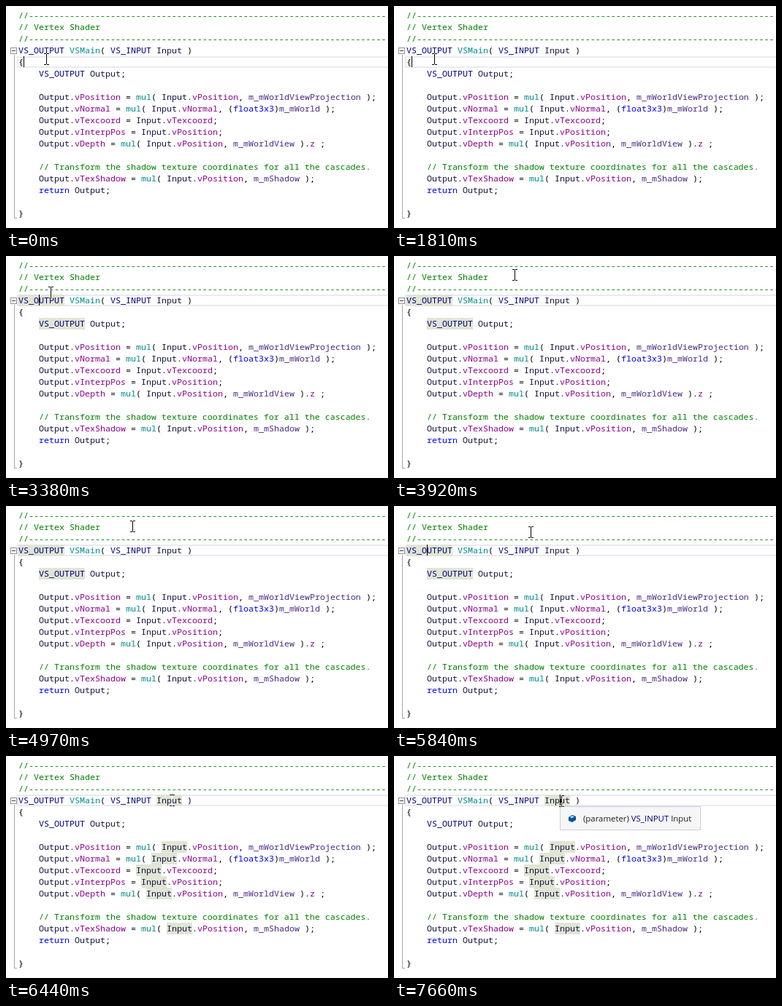
An HTML page for the animation above (8000 ms loop, 523 by 305 pixels).

```html
<!DOCTYPE html>
<html lang="en">
<head>
<meta charset="utf-8">
<title>Shader editor hover</title>
<style>
html, body { margin: 0; width: 100%; height: 100%; overflow: hidden; background: #fff; }
svg { display: block; width: 523px; height: 305px; background: #fff; isolation: isolate; }
text { white-space: pre; }
#code text { font: 11.6667px "Noto Sans Mono", "DejaVu Sans Mono", monospace; }
.tip text { font: 11.4px "Open Sans", "Noto Sans", sans-serif; fill: #1e1e1e; }
.tip .panel { fill: #f6f6f7; stroke: #cccedb; }
.plain { fill: #000; }
.comment { fill: #008000; }
.type, .tip .type { fill: #00007c; }
.func { fill: #008b8b; }
.field { fill: #8b008b; }
.global { fill: #4b2a85; }
.keyword, .tip .keyword { fill: #0000e6; }
.variable { fill: #14143c; }
#marks { fill: #e0e5d5; }
#cursor { fill: #fff; mix-blend-mode: difference; }
</style>
</head>
<body>
<svg viewBox="0 0 523 305" shape-rendering="crispEdges">
  <rect width="523" height="305" fill="#fff"/>
  <rect id="current" x="16" width="600" height="14" fill="none" stroke="#eaeaf2" stroke-width="2"/>
  <g id="marks"><g id="typeMarks"></g><g id="inputMarks"></g></g>
  <g fill="none" stroke="#a5a5a5">
    <path d="M11.5 67V291.5H15"/>
    <rect x="6.5" y="57.5" width="8" height="8" fill="#fff" stroke="#909090"/>
    <path d="M8 61.5H13" stroke="#404040"/>
  </g>
  <g id="code"></g>
  <rect id="caret" width="1" height="15"/>
  <g id="structTip" class="tip" transform="translate(48 69)">
    <rect class="panel" x=".5" y=".5" width="142" height="32"/>
    <path d="M12 12h14v4h-14zM12 18h5v4h-5zM20 18h6v4h-6z" fill="#00539c"/>
    <text x="32" y="21"><tspan class="keyword">struct</tspan> <tspan class="type">VS_OUTPUT</tspan></text>
  </g>
  <g id="paramTip" class="tip">
    <rect class="panel" x=".5" y=".5" width="192" height="32"/>
    <g shape-rendering="auto">
      <path d="M12 15l5-3 5 2v5l-5 3-5-2z" fill="#00539c"/>
      <path d="M13.5 15l3.500-1.700 3 1.200-3.500 1.800z" fill="#d5e4f2"/>
    </g>
    <text x="32" y="21">(parameter) <tspan class="type">VS_INPUT</tspan> Input</text>
  </g>
  <path id="cursor" d="M-3 0h3v1h-3zM1 0h3v1h-3zM0 1h1v14h-1zM-3 15h3v1h-3zM1 15h3v1h-3z"/>
</svg>
<script>
const LOOP = 8000, STEP = 60;
const CHAR = 7, LINE = 16, LEFT = 17, TOP = 5;
const rule = "//" + "-".repeat(70);
const lines = [
  rule,
  "// Vertex Shader",
  rule,
  "VS_OUTPUT VSMain( VS_INPUT Input )",
  "{",
  "    VS_OUTPUT Output;",
  "",
  "    Output.vPosition = mul( Input.vPosition, m_mWorldViewProjection );",
  "    Output.vNormal = mul( Input.vNormal, (float3x3)m_mWorld );",
  "    Output.vTexcoord = Input.vTexcoord;",
  "    Output.vInterpPos = Input.vPosition;",
  "    Output.vDepth = mul( Input.vPosition, m_mWorldView ).z ;",
  "",
  "    // Transform the shadow texture coordinates for all the cascades.",
  "    Output.vTexShadow = mul( Input.vPosition, m_mShadow );",
  "    return Output;",
  "",
  "}"
];
const kinds = [
  ["comment", /^\/\//],
  ["type", /^VS_/],
  ["func", /^(VSMain|mul)$/],
  ["field", /^(v[A-Z]|z$)/],
  ["global", /^m_/],
  ["keyword", /^(return|float3x3)$/],
  ["variable", /^(Output|Input)$/]
];

const $ = id => document.getElementById(id);
function add(parent, tag, attrs, content = "") {
  const el = document.createElementNS("http://www.w3.org/2000/svg", tag);
  for (const key in attrs) el.setAttribute(key, attrs[key]);
  el.textContent = content;
  parent.append(el);
}

lines.forEach((line, row) => {
  const y = TOP + row * LINE;
  for (const { 0: word, index } of line.matchAll(/\/\/.*|\w+|[^\w\s]+/g)) {
    const x = LEFT + index * CHAR;
    const kind = kinds.find(([, test]) => test.test(word));
    add($("code"), "text", { x, y: y + 12, class: kind ? kind[0] : "plain" }, word);
    const marks = { VS_OUTPUT: "typeMarks", Input: "inputMarks" }[word];
    if (marks) add($(marks), "rect", { x, y, width: word.length * CHAR, height: LINE });
  }
});

// Pointer stops: time, stem x, top y
const path = [
  [0, 55, 65], [2090, 55, 65], [2210, 50, 52], [2330, 48, 48],
  [3320, 48, 48], [3380, 61, 42], [3740, 140, 24], [3920, 165, 18], [4100, 173, 20],
  [5660, 173, 20], [5840, 187, 28], [6080, 218, 45], [6260, 227, 51],
  [6320, 226, 53], [6440, 227, 53], [7060, 227, 53], [7300, 229, 54], [LOOP, 229, 54]
];
const blinks = [250, 750, 1310, 1810, 2330, 2570, 2880, 3380, 3860,
  4410, 4970, 5470, 5960, 6440, 7000, 7480];
const CLICK_TYPE = 2570, CLICK_INPUT = 6440;

function pointerAt(t) {
  const i = path.findIndex(p => p[0] > t);
  const [t0, x0, y0] = path[i - 1], [t1, x1, y1] = path[i];
  const k = Math.floor((t - t0) / STEP) * STEP / (t1 - t0);
  return [x0 + (x1 - x0) * k, y0 + (y1 - y0) * k].map(Math.round);
}

const move = (el, x, y) => el.setAttribute("transform", `translate(${x} ${y})`);
const show = (el, alpha) => el.setAttribute("opacity", Number(alpha));
const within = (t, from, to) => t >= from && t < to;

function render(t) {
  move($("cursor"), ...pointerAt(t));

  const caret = t < CLICK_TYPE ? [24, 69] : t < CLICK_INPUT ? [45, 53] : [227, 53];
  move($("caret"), ...caret);
  show($("caret"), blinks.filter(b => b <= t).length % 2 === 0);
  $("current").setAttribute("y", caret[1] + 1);

  show($("typeMarks"), within(t, CLICK_TYPE, CLICK_INPUT));
  show($("inputMarks"), t >= CLICK_INPUT);

  show($("structTip"), within(t, 2390, CLICK_TYPE));
  move($("paramTip"), t < CLICK_INPUT ? 224 : 227, 69);
  show($("paramTip"), within(t, 6320, CLICK_INPUT) || t >= 7660 ? 1 : t >= 7600 ? 0.6 : 0);
}

const start = performance.now();
function tick() {
  render((performance.now() - start) % LOOP);
  requestAnimationFrame(tick);
}
tick();
</script>
</body>
</html>
```
